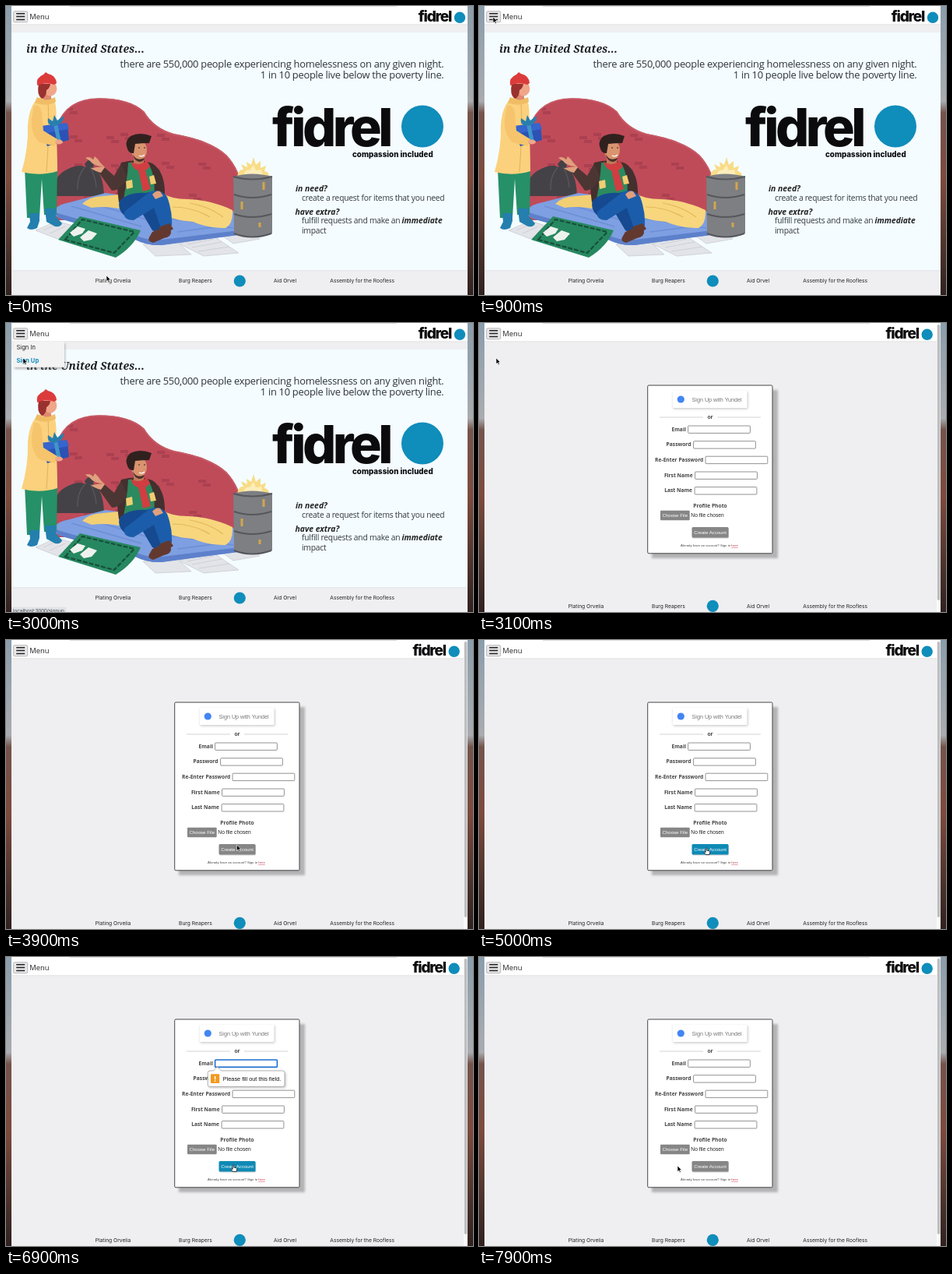
An HTML page for the animation above (8 s loop, 600 by 371 pixels).

```html
<!DOCTYPE html>
<html lang="en">
<head>
<meta charset="utf-8">
<title>Sign-up walkthrough</title>
<style>
html, body { margin: 0; width: 100%; height: 100%; overflow: hidden; background: #fff; }
svg { display: block; width: 600px; height: 371px; }
text { white-space: pre; }
.ui { font-family: "Open Sans", "Noto Sans", sans-serif; }
.inter { font-family: Inter, sans-serif; }
.arial { font-family: "Liberation Sans", Arial, sans-serif; }
.bi { font-weight: 700; font-style: italic; }
.brand { font-family: Inter, sans-serif; font-weight: 800; fill: #0b0b0d; }
.lead { font-size: 12.9px; letter-spacing: -.28px; fill: #2f3438; }
.copy { font-size: 10.3px; letter-spacing: -.23px; fill: #33383c; }
.foot { font-size: 6.7px; fill: #222; }
.label { font-size: 6.7px; font-weight: 700; fill: #444; }
.end { text-anchor: end; }
.mid { text-anchor: middle; }
</style>
</head>
<body>
<svg viewBox="0 0 600 371" xmlns="http://www.w3.org/2000/svg">
<defs>
  <linearGradient id="desk" x1="0" y1="0" x2="0" y2="1">
    <stop offset="0" stop-color="#8a9dab"/>
    <stop offset=".33" stop-color="#a9acb0"/>
    <stop offset=".37" stop-color="#75544c"/>
    <stop offset=".6" stop-color="#7d4a3d"/>
    <stop offset=".8" stop-color="#53372f"/>
    <stop offset="1" stop-color="#30211f"/>
  </linearGradient>
  <filter id="soft" x="-20%" y="-20%" width="150%" height="150%"><feGaussianBlur stdDeviation="1.6"/></filter>
  <clipPath id="wallClip"><use href="#wall"/></clipPath>
</defs>

<rect width="600" height="371" fill="url(#desk)"/>
<rect x="7" width="586" height="371" fill="#efeef0"/>

<g id="home">
  <rect x="7" y="34" width="586" height="306" fill="#f4fcff"/>
  <path d="M7 339.7H593" stroke="#dcdcde" stroke-width=".7"/>
  <text x="26" y="60" font-size="14" class="bi" font-family="Noto Serif, serif" fill="#1d1f22">in the United States...</text>
  <g class="ui">
    <text x="562.5" y="79" class="lead end">there are 550,000 people experiencing homelessness on any given night.</text>
    <text x="562.5" y="92.7" class="lead end">1 in 10 people live below the poverty line.</text>
    <text x="372" y="238" font-size="10.4" class="bi" fill="#222">in need?</text>
    <text x="380" y="250" class="copy">create a request for items that you need</text>
    <text x="371.5" y="268" font-size="10.4" class="bi" fill="#222">have extra?</text>
    <text x="380" y="279.3" class="copy">fulfill requests and make an</text>
    <text x="508.5" y="279.3" font-size="10.2" class="bi" fill="#222">immediate</text>
    <text x="380" y="291.7" class="copy">impact</text>
  </g>
  <text x="342" y="180" font-size="68" letter-spacing="-4.5" class="brand">fidrel</text>
  <circle cx="535" cy="154.5" r="27" fill="#0f8dbb"/>
  <text x="445" y="194" font-size="9.8" class="brand">compassion included</text>

  <!-- illustration -->
  <path id="wall" fill="#bf4b59" d="M64 262V155Q78 119 119 118.5Q158 118 177 135Q190 157 216 164Q262 172 283 191Q301 210 305 240V275H64Z"/>
  <g id="bricks" clip-path="url(#wallClip)" fill="#ab4050"></g>
  <path d="M66 153Q79 119 119 119Q158 119 177 136Q190 158 216 165Q262 173 283 192Q300 210 304 240" fill="none" stroke="#c85c67" stroke-width="1.6"/>

  <path d="M62 244Q58 219 80 209Q94 202 103 207L101 203Q107 194 115 197L112 206Q125 214 126 244Z" fill="#444246"/>
  <path d="M101 207Q91 219 92 236M108 207Q115 218 116 233" stroke="#5b595e" fill="none" stroke-width="1.2"/>

  <g fill="#e2e4e8" stroke="#c5c8ce" stroke-width=".7">
    <path d="M38 288L66 276L92 284L66 299Z"/>
    <path d="M222 305L266 295L299 317L254 321Z"/>
    <path d="M176 306L220 303L238 319L192 321Z"/>
    <path d="M278 295L318 290L326 299L292 305Z"/>
    <path d="M233 306L267 299M239 310L277 303M247 315L287 309M48 288L66 280M56 292L76 283" fill="none"/>
  </g>
  <path d="M62 262Q66 255 82 252L128 240L310 266Q318 274 315 284Q312 293 298 294L200 307Q182 308 166 300L70 273Q60 269 62 262Z" fill="#7e9fe1"/>
  <path d="M62 264Q63 270 72 274L166 300Q182 308 200 307L298 294Q312 293 315 282Q311 287 300 288L200 300Q184 302 168 295L70 267Z" fill="#5d80cb"/>
  <path d="M84 257L174 283M106 252L200 280M206 272L292 285M220 290L282 282" stroke="#6c8fd6" stroke-width="1.6" fill="none"/>
  <path d="M98 254Q106 245 124 244L158 241V263Q132 256 110 259Z" fill="#f3cf73"/>
  <path d="M194 238Q212 248 234 248Q264 249 291 262Q292 280 282 285Q262 286 240 277Q212 275 196 264Z" fill="#f8d67e"/>
  <path d="M214 258Q240 258 262 271M236 253Q260 257 279 271" stroke="#e3b95c" stroke-width="1.2" fill="none"/>

  <path d="M95 270L173 288Q164 309 141 323L67 300Z" fill="#268860"/>
  <path d="M76 300L98 274L165 290L139 317Z" fill="none" stroke="#174f3b" stroke-width="2.2" stroke-dasharray="6 2"/>
  <path d="M82 291L92 283L102 286L98 292L87 296ZM95 297L106 288L117 292L110 300L100 302Z" fill="#eef2ee"/>

  <path d="M297 219Q299 209 305 210L302 203L310 207L309 200L315 204L318 194L321 204L327 199L327 208L334 205L332 212Q338 213 338 219Z" fill="#f8dc86"/>
  <path d="M305 217Q308 209 313 211L318 204L321 211L328 210L330 218Z" fill="#fcedba"/>
  <path d="M292 219Q316 212 342 219V292Q316 302 293 292Z" fill="#7d7f82"/>
  <path d="M292 219Q316 226 342 219M293 242Q316 250 341 242M293 267Q316 275 341 267M293 292Q316 301 341 292" fill="none" stroke="#55575b" stroke-width="2"/>
  <path d="M331 226V236M303 251V261M326 278V284" fill="none" stroke="#d3a54d" stroke-width="3"/>

  <g id="giver">
    <path d="M24 208L27 272H43L46 222L49 268H65L66 206Z" fill="#269068"/>
    <path d="M30 266H43V276L40 285Q32 289 27 285L31 277ZM50 260H64V270L72 279Q71 284 63 283L52 277Z" fill="#247fae"/>
    <path d="M41 119Q51 113 62 120Q66 133 64 150Q66 183 66 212Q44 219 20 213Q29 182 28 153Q30 128 41 119Z" fill="#fbd17d"/>
    <path d="M54 121Q56 160 52 213" stroke="#e2b15e" stroke-width="1" fill="none"/>
    <path d="M48 108H58V120Q53 124 47 119Z" fill="#df8a70"/>
    <ellipse cx="57" cy="106" rx="8.3" ry="9.5" fill="#f0a689"/>
    <path d="M42 100H57Q56 106 52 108Q52 117 46 119Q39 114 42 100Z" fill="#9a312e"/>
    <path d="M40 102Q38 92 48 88L51 85L54 87Q64 89 65 99L62 101Q52 97 40 102Z" fill="#dc3b3c"/>
    <path d="M40 117Q52 124 63 117L64 123Q51 130 37 124Z" fill="#f0bd65"/>
    <path d="M45 158L79 153L81 172L53 180Z" fill="#2b52b4"/>
    <path d="M44 154L78 150L81 158L47 164Z" fill="#3565cd"/>
    <path d="M61 152L66 151L71 175L66 176Z" fill="#4195c7"/>
    <path d="M62 154Q52 153 54 144L60 148L62 140L66 147L74 141Q75 151 62 154Z" fill="#287fae"/>
    <path d="M36 128Q44 126 46 137L48 160L66 171L63 180L43 175Q32 165 33 145Z" fill="#f5c46c"/>
    <ellipse cx="68" cy="174.5" rx="5" ry="3" fill="#f0a689"/>
  </g>

  <g id="sitter">
    <path d="M148 201Q169 195 188 202Q205 213 204 244L190 251L145 252Q140 224 148 201Z" fill="#43302f"/>
    <path d="M148 202L139 218L125 206L118 212L136 237Q147 237 156 221Z" fill="#4b3634"/>
    <path d="M125 206Q113 206 108 199L102 195Q107 192 112 197L114 193Q119 197 121 201L127 207L122 214Q114 212 109 208Z" fill="#e0a07d"/>
    <path d="M157 201L183 202Q193 220 190 246L151 248Q156 222 157 201Z" fill="#2b8a5f"/>
    <path d="M154 225L162 223L163 233L155 235ZM184 219L190 217L193 228L186 229Z" fill="#f0cd72"/>
    <path d="M164 190H177V203Q171 209 164 203Z" fill="#bf7959"/>
    <ellipse cx="171" cy="185" rx="10" ry="13" fill="#d9946f"/>
    <path d="M155 180Q153 173 160 167Q172 161 187 167L184 176Q174 176 166 177L164 189Q157 190 155 180Z" fill="#30211f"/>
    <path d="M163 190Q167 200 178 195Q177 200 171 200Q164 198 163 190Z" fill="#4a302a"/>
    <path d="M170 182H172M177 182H179" stroke="#2c2424"/>
    <path d="M171 192Q175 194 178 191" fill="none" stroke="#fff" stroke-width="1.2"/>
    <path d="M160 200Q171 207 181 198L185 206Q182 210 179 211L186 235L176 238L170 211Q163 210 160 200Z" fill="#d03e42"/>
    <path d="M146 250Q158 238 180 240Q192 236 197 246L210 284L198 292L188 288L175 266L156 272Q142 263 146 250Z" fill="#154a90"/>
    <path d="M152 264L184 239Q198 233 207 245Q214 263 213 282L199 285L190 259L164 275Q150 275 152 264Z" fill="#1c5dab"/>
    <path d="M188 242Q193 236 198 238L202 244L192 248Z" fill="#e0a07d"/>
    <path d="M188 290L202 284L212 289Q213 296 203 298L189 304Q181 302 184 297ZM196 284L210 279L215 286L208 291Z" fill="#63392f"/>
  </g>
</g>

<g id="form">
  <g class="ui">
    <rect x="222" y="86" width="162" height="216" fill="#a9a9ab" opacity=".85" filter="url(#soft)"/>
    <rect x="216.7" y="80" width="160.3" height="215.8" rx="1.5" fill="#fff" stroke="#333" stroke-width=".9"/>
    <rect x="249.5" y="88.2" width="96" height="22" rx="1" fill="#999" opacity=".55" filter="url(#soft)"/>
    <rect x="249" y="87" width="95.5" height="22" rx="1" fill="#fff"/>
    <circle cx="259.3" cy="98" r="4.6" fill="#4285f4"/>
    <text x="273.5" y="101" font-size="7.2" class="arial" fill="#757575">Sign Up with Yundel</text>
    <path d="M232 121H288M306 121H362" stroke="#c9c9c9" stroke-width=".8"/>
    <text x="297" y="123" class="label mid">or</text>
    <g id="fields"></g>
    <text x="297" y="237" class="label mid">Profile Photo</text>
  </g>
  <g class="arial">
    <rect x="233" y="240.8" width="37.7" height="12.4" rx="1" fill="#868686"/>
    <text x="235.5" y="249.2" font-size="6.1" fill="#fff">Choose File</text>
    <text x="272.3" y="249.3" font-size="6.7" fill="#222">No file chosen</text>
    <rect x="274" y="262.8" width="47" height="13.6" rx="1.5" fill="#aaa" opacity=".6"/>
    <rect id="create" x="273.5" y="262" width="47" height="13.5" rx="1.5"/>
    <text x="297" y="270.9" font-size="6.1" class="mid" fill="#fff">Create Account</text>
    <text x="259" y="287.2" font-size="4.3" fill="#444">Already have an account? Sign in <tspan fill="#c8283c" text-decoration="underline">here</tspan></text>
    <g id="tip">
      <rect x="260.5" y="147.5" width="99" height="20.5" rx="2.5" fill="#777" opacity=".45" filter="url(#soft)"/>
      <path d="M262 146H266.5L271.5 141L276.5 146H355.5Q358 146 358 148.5V164Q358 166.5 355.5 166.5H262Q259.3 166.5 259.3 164V148.5Q259.3 146 262 146Z" fill="#fff" stroke="#a0a0a0" stroke-width=".8"/>
      <rect x="263" y="150.3" width="11.2" height="11.7" rx="1" fill="#f29a1f"/>
      <path d="M268.6 153V157.3M268.6 158.6V160" stroke="#fff" stroke-width="1.5"/>
      <text x="278.7" y="158.8" font-size="7.35" fill="#111">Please fill out this field.</text>
    </g>
  </g>
</g>

<g id="footer" class="inter foot">
  <text x="114.7" y="355.3">Plating Orvelia</text>
  <text x="222" y="355.3">Burg Reapers</text>
  <circle cx="300.3" cy="353" r="7.6" fill="#0f8dbb"/>
  <text x="344" y="355.3">Aid Orvel</text>
  <text x="416.3" y="355.3">Assembly for the Roofless</text>
</g>

<rect x="7" width="586" height="23.5" fill="#fff"/>
<path d="M7 23.8H593" stroke="#dedee0" stroke-width=".7"/>
<path d="M82 .3H502" stroke="#c9c9cc" stroke-width=".8"/>
<rect id="burger" x="9.7" y="6.8" width="18" height="14" rx="1.5" fill="#e9e9eb"/>
<path d="M13.2 9.8H24.2M13.2 13.6H24.2M13.2 17.4H24.2" stroke="#222" stroke-width="1.5"/>
<text x="30.3" y="17" font-size="9.4" class="ui" fill="#222">Menu</text>
<g id="logo">
  <text x="529.8" y="20.3" font-size="19.1" letter-spacing="-1.27" class="brand">fidrel</text>
  <circle cx="583" cy="14.8" r="7.2" fill="#0f8dbb"/>
</g>
<g id="bar">
  <rect x="588" width="5" height="371" fill="#fafafa"/>
  <rect x="588.8" y="2" width="3.6" height="354" rx="1.8" fill="#bdbdc0"/>
</g>

<g id="menu" class="inter" font-size="7.6">
  <rect x="11" y="26" width="65" height="33" fill="#777" opacity=".5" filter="url(#soft)"/>
  <rect x="9.5" y="23.5" width="65.5" height="33.3" fill="#f3f3f4"/>
  <text id="in" x="13.5" y="34.2">Sign In</text>
  <text id="up" x="13.5" y="51.2">Sign Up</text>
</g>
<g id="status">
  <rect x="7" y="364.8" width="70.5" height="7" fill="#dfe2e6"/>
  <text id="link" x="9" y="371.8" font-size="6.8" class="arial" fill="#4a4d52"></text>
</g>

<g id="cursor">
  <path id="arrow" d="M0 0V7.6L1.8 6L3 8.7L4.3 8.1L3.1 5.5L5.4 5.4Z" fill="#000" stroke="#fff" stroke-width=".6"/>
  <path id="hand" d="M-.8 .3Q0 -.7 .8 .3V3.2L4 3.8Q5 4.2 4.7 5.6L4 8.6H-.5L-2.9 5.5Q-2.6 4.2 -.8 5.4Z" fill="#fff" stroke="#111" stroke-width=".8" stroke-linejoin="round"/>
</g>
</svg>
<script>
const $ = id => document.getElementById(id);
const set = (id, attrs) => { for (const k in attrs) $(id).setAttribute(k, attrs[k]); };
const show = (id, on) => set(id, { display: on ? "inline" : "none" });
const LOOP = 8000;

// [label, label end, input left, input top]
$("fields").innerHTML = [
  ["Email", 266, 268.6, 132],
  ["Password", 272.5, 275.6, 151.7],
  ["Re-Enter Password", 288.3, 291, 171.2],
  ["First Name", 274.6, 277.6, 191],
  ["Last Name", 274, 277.1, 210.6]
].map(([name, end, x, y], i) =>
  `<text x="${end}" y="${y + 6.7}" class="label end">${name}</text>
   <rect id="field${i}" x="${x}" y="${y}" width="79.8" height="9.4" rx="1" fill="#fff" stroke="#777" stroke-width=".8"/>`
).join("");

let bricks = "";
for (let i = 0; i < 15; i++) {
  const x = 76 + (i * 53) % 206, y = 130 + (i * 37) % 112;
  bricks += `<rect x="${x}" y="${y}" width="10" height="4"/><rect x="${x + 6}" y="${y + 5}" width="10" height="4"/>`;
}
$("bricks").innerHTML = bricks;

// cursor stops: [ms, x, y]
const path = [
  [0, 129, 346], [100, 129, 346], [900, 18, 14], [1300, 18, 14],
  [1600, 22, 25.5], [2000, 22, 25.5], [2500, 22, 45], [3100, 22, 45],
  [3800, 296.5, 263], [3950, 296.5, 263], [4250, 292, 267],
  [7200, 292, 267], [7500, 255, 268], [LOOP, 255, 268]
];

function cursorAt(t) {
  const i = Math.max(1, path.findIndex(p => p[0] > t));
  const [t0, x0, y0] = path[i - 1], [t1, x1, y1] = path[i];
  const u = (t - t0) / (t1 - t0), e = u * u * (3 - 2 * u);
  return [x0 + (x1 - x0) * e, y0 + (y1 - y0) * e];
}

function draw(t) {
  const within = (a, b) => t >= a && t < b;
  const signup = t >= 3100;
  const onIn = within(1500, 2250), onUp = within(2250, 3100);
  const onCreate = within(4100, 7350);
  const focused = within(5300, 7700), invalid = within(5500, 7700);
  const open = within(1000, 3100), ring = within(1000, 2900);

  show("home", !signup);
  show("form", signup);
  show("bar", signup);
  set("logo", { transform: `translate(${signup ? -7.3 : 0} 0)` });
  set("footer", { transform: `translate(0 ${signup ? 10.3 : 0})` });

  set("burger", { stroke: ring ? "#2f6fc4" : "#a5a5a8", "stroke-width": ring ? 1.5 : .8 });
  show("menu", open);
  for (const [id, on] of [["in", onIn], ["up", onUp]])
    set(id, { fill: on ? "#0f8dbb" : "#222", "font-weight": on ? 700 : 400 });
  show("status", within(1900, 3100));
  $("link").textContent = "localhost:3000/" + (onUp ? "signup" : "signin");

  set("create", { fill: onCreate ? "#0f8ab5" : "#868686" });
  show("tip", invalid);
  set("field0", { stroke: focused ? "#1f6fd0" : "#777", "stroke-width": focused ? 1.6 : .8 });

  const hand = onIn || within(2250, 2900) || onCreate;
  show("hand", hand);
  show("arrow", !hand);
  set("cursor", { transform: `translate(${cursorAt(t).map(v => v.toFixed(2)).join(" ")})` });
}

let start;
function tick(now) {
  start ??= now;
  draw((now - start) % LOOP);
  requestAnimationFrame(tick);
}
draw(0);
requestAnimationFrame(tick);
</script>
</body>
</html>
```
